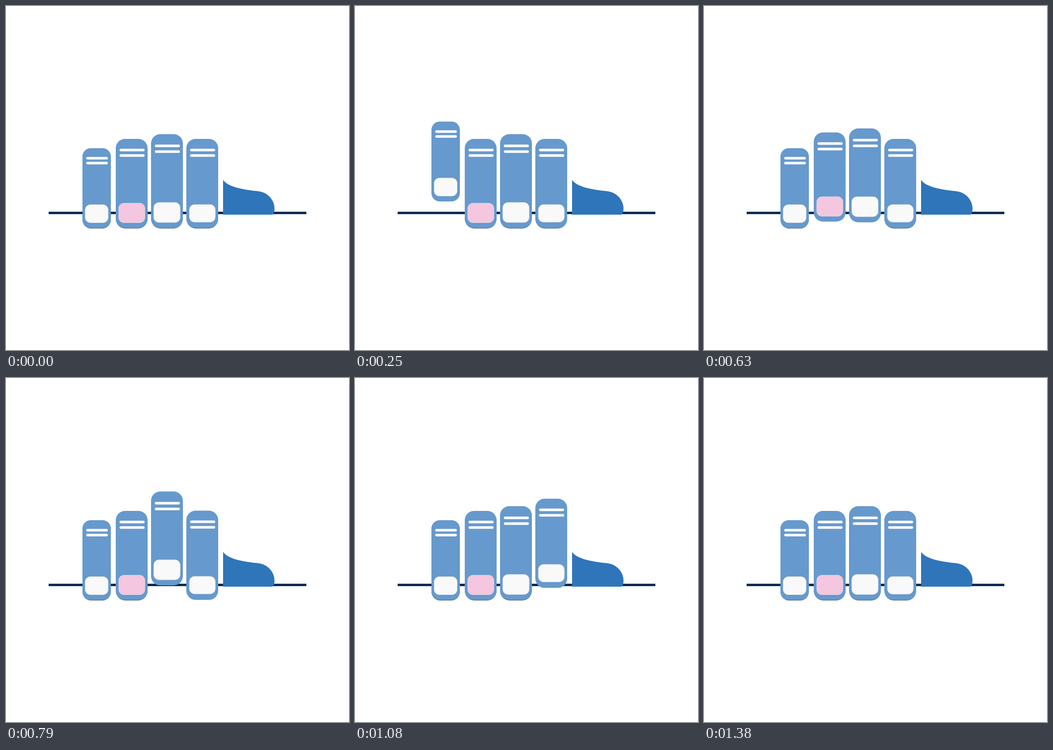
An HTML page for the animation above (1.54 s loop, 700 by 704 pixels).

```html
<!DOCTYPE html>
<html lang="en">
<head>
<meta charset="utf-8">
<title>Tapping fingers</title>
<style>
  html, body { margin: 0; width: 100%; height: 100%; overflow: hidden; background: #fff; }
  svg { display: block; width: 100vw; height: 100vh; }
</style>
</head>
<body>
<svg id="stage" viewBox="0 0 700 704">
  <rect x="87" y="421" width="526" height="5" fill="#0d2c52"/>
  <path fill="#2f75ba" d="M443 356C454 371 485 376 514 379C535 381 548 398 548 414Q548 424 544 427H443Z"/>
</svg>
<script>
const LOOP = 1540, FPS = 24, LAST = 33, FLOOR = 454.5;
const SVG = 'http://www.w3.org/2000/svg';
const stage = document.getElementById('stage');

// bars: y of the two stripes; card: x, y, w, h; keys: start, peak, end in ticks
const fingers = [
  { x: 156, y: 291, w: 58, r: 17, bars: [309, 319], card: [161.5, 406.5, 47, 37],
    tone: '#f9f9f9', lift: 54.5, keys: [0, 6, 11] },
  { x: 224, y: 272, w: 65, r: 19, bars: [292.2, 303.5], card: [230, 403.5, 53.5, 40],
    tone: '#f4c6df', lift: 26.5, keys: [6, 11.5, 18.5] },
  { x: 296, y: 262.3, w: 65, r: 19, bars: [283.8, 295.5], card: [301.5, 402, 54, 41],
    tone: '#f9f9f9', lift: 30, keys: [12, 19, 24.6] },
  { x: 368, y: 272, w: 65, r: 19, bars: [292.2, 303.5], card: [374.2, 406.3, 53, 36],
    tone: '#f9f9f9', lift: 28, keys: [18.3, 28, 33] }
];

function add(parent, tag, attrs = {}) {
  const el = document.createElementNS(SVG, tag);
  for (const k in attrs) el.setAttribute(k, attrs[k]);
  return parent.appendChild(el);
}

const box = (parent, x, y, width, height, rx, fill, more) =>
  add(parent, 'rect', { x, y, width, height, rx, fill, ...more });

for (const f of fingers) {
  const h = FLOOR - f.y;
  f.shade = box(stage, f.x + 0.5, f.y + 0.7, f.w - 1, h, f.r, '#24466e');
  f.group = add(stage, 'g');
  box(f.group, f.x, f.y, f.w, h, f.r, '#6699cd');
  for (const y of f.bars)
    box(f.group, f.x + 7.8, y, f.w - 14, 5, 2.5, '#fff', { stroke: '#dde3ea', 'stroke-width': 0.5 });
  box(f.group, ...f.card, 10.5, f.tone, { stroke: '#d9dade', 'stroke-width': 0.9 });
}

function ease(p) {
  p = Math.min(1, Math.max(0, p));
  return p * p * (3 - 2 * p);
}

function draw(now) {
  const tick = Math.min(LAST, Math.floor((now % LOOP) * FPS / 1000 + 0.1));
  for (const f of fingers) {
    const [a, b, c] = f.keys;
    const up = f.lift * (tick < b ? ease((tick - a) / (b - a)) : ease((c - tick) / (c - b)));
    f.group.setAttribute('transform', `translate(0 ${-up.toFixed(2)})`);
    f.shade.setAttribute('visibility', up < 0.1 ? 'visible' : 'hidden');
  }
}

const start = performance.now();
function loop() {
  draw(performance.now() - start);
  requestAnimationFrame(loop);
}
loop();
</script>
</body>
</html>
```
